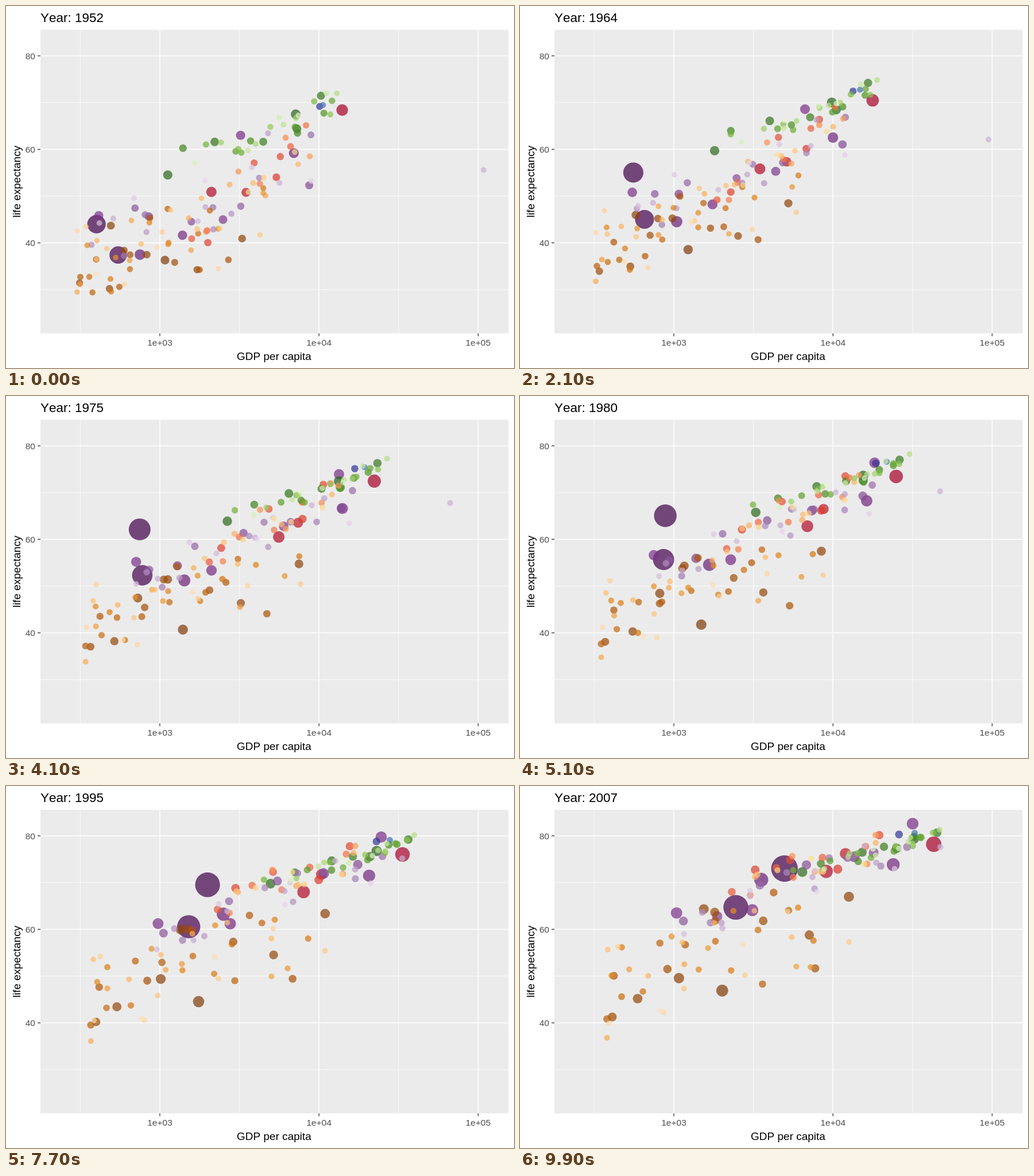
Recreate the animation shown at these times as an HTML page. Size 885 px wide and 632 px high, loop 10000 ms.

```html
<!DOCTYPE html>
<html lang="en">
<head>
<meta charset="utf-8">
<title>GDP and life expectancy</title>
<style>
  html, body { margin: 0; width: 100%; height: 100%; overflow: hidden; background: #fff; }
  svg { display: block; width: 885px; height: 632px; }
  text { font-family: "Liberation Sans", Arial, sans-serif; font-size: 19px; font-kerning: none; }
  #year { font-size: 22.5px; }
  .tick { font-size: 15.5px; fill: #4d4d4d; }
  .grid { stroke: #fff; }
  .mark { stroke: #333; stroke-width: 1.3; }
  #dots { fill-opacity: .7; }
</style>
</head>
<body>
<svg viewBox="0 0 885 632">
  <rect x="60" y="41.5" width="815.5" height="530" fill="#ebebeb"/>
  <g id="axes"></g>
  <g id="dots"></g>
  <text id="year" x="60" y="28">Year: 1952</text>
  <text x="467" y="618" text-anchor="middle">GDP per capita</text>
  <text transform="translate(25 306.5) rotate(-90)" text-anchor="middle">life expectancy</text>
</svg>
<script>
const $ = id => document.getElementById(id);
const FRAMES = 100, STEP = 100, FIRST = 1952, SPAN = 55, SURVEYS = 11;

const px = gdp => 268 + 277.25 * (Math.log10(gdp) - 3);
const py = life => 87 + (80 - life) * 8.163;
const radius = pop => 4.5 + 18.7 * Math.sqrt(pop / 1318);
const mix = (a, b, t) => a + (b - a) * t;
const clamp = v => Math.min(1, Math.max(0, v));
const easeOut = t => t * (1.5 - .5 * t);
const noise = (a, b) => {
  const v = Math.sin(a * 12.9898 + b * 78.233) * 43758.5453;
  return (v - Math.floor(v)) * 2 - 1;
};

function add(parent, tag, attrs, label) {
  const el = document.createElementNS("http://www.w3.org/2000/svg", tag);
  for (const name in attrs) el.setAttribute(name, attrs[name]);
  if (label) el.textContent = label;
  return $(parent).appendChild(el);
}

function drawAxes() {
  const line = (x1, y1, x2, y2, cls, w) =>
    add("axes", "line", { x1, y1, x2, y2, class: cls, ...(w && { "stroke-width": w }) });
  const column = (x, w) => line(x, 41.5, x, 571.5, "grid", w);
  const row = (y, w) => line(60, y, 875.5, y, "grid", w);

  for (const e of [2.5, 3.5, 4.5]) column(px(10 ** e), .75);
  for (const l of [30, 50, 70]) row(py(l), .75);
  for (const e of [3, 4, 5]) {
    const x = px(10 ** e);
    column(x, 1.45);
    line(x, 571.5, x, 576.5, "mark");
    add("axes", "text", { x, y: 593, class: "tick", "text-anchor": "middle" }, "1e+0" + e);
  }
  for (const l of [40, 60, 80]) {
    const y = py(l);
    row(y, 1.45);
    line(55, y, 60, y, "mark");
    add("axes", "text", { x: 51, y: y + 5.8, class: "tick", "text-anchor": "end" }, String(l));
  }
}

// Each trend runs from the poorest to the richest: log GDP, life expectancy and its spread.
// Shades run from the most to the least populous; pop is the range in millions.
const regions = {
  africa: {
    ramp: ["7f3b08", "b35806", "e08214", "fdb863", "fee0b6"],
    pop: [135, .2], growth: 3.7, count: 51, largest: 80, bend: 1.4,
    from: { gdp: [2.48, 3.65], life: [35, 44], spread: 8 },
    to: { gdp: [2.58, 4.1], life: [47, 62], spread: 10 }
  },
  americas: {
    ramp: ["a50026", "d73027", "f46d43", "fdae61", "fee090"],
    pop: [301, 1], growth: 2.5, count: 22, largest: 44, bend: 1,
    from: { gdp: [3.16, 4], life: [40, 66], spread: 6 },
    to: { gdp: [3.35, 4.35], life: [69, 78], spread: 3 }
  },
  asia: {
    ramp: ["40004b", "762a83", "9970ab", "c2a5cf", "e7d4e8"],
    pop: [1318, .7], growth: 2.6, count: 28, largest: 169, bend: 1,
    from: { gdp: [2.52, 4], life: [36, 61], spread: 8 },
    to: { gdp: [2.95, 4.6], life: [60, 79], spread: 4 }
  },
  europe: {
    ramp: ["276419", "4d9221", "7fbc41", "b8e186", "e6f5d0"],
    pop: [82, .3], growth: 1.35, count: 29, largest: 64, bend: .7,
    from: { gdp: [3.05, 4.15], life: [57, 71.5], spread: 3 },
    to: { gdp: [3.75, 4.67], life: [73, 81], spread: 1.2 }
  },
  oceania: {
    ramp: ["313695", "4575b4"],
    pop: [20, 4], growth: 2.2, count: 2, largest: 20, bend: 1,
    from: { gdp: [4, 4.03], life: [69, 69.4], spread: .2 },
    to: { gdp: [4.4, 4.54], life: [80, 81], spread: .2 }
  }
};

// The most prominent dots: GDP and life expectancy at a few evenly spaced times.
const leaders = [
  { region: "asia", pop: 1318, path: [[400, 44], [590, 57], [845, 64.8], [1780, 69.1], [4959, 73]] },
  { region: "asia", pop: 1110, path: [[547, 37.4], [834, 55.4], [2452, 64.7]] },
  { region: "americas", pop: 301, path: [[13990, 68.4], [42952, 78.2]] },
  { region: "asia", pop: 224, path: [[750, 37.5], [3541, 70.6]] },
  { region: "americas", pop: 190, path: [[2109, 50.9], [6840, 62.5], [9066, 72.4]] },
  { region: "africa", pop: 135, path: [[1077, 36.3], [2014, 46.9]] },
  { region: "asia", pop: 127, path: [[3217, 63], [17950, 76.2], [31656, 82.6]] },
  { region: "americas", pop: 109, path: [[3478, 50.8], [8640, 66.2], [11978, 76.2]] },
  { region: "europe", pop: 82, path: [[7144, 67.5], [32170, 79.4]] },
  { region: "asia", pop: 2.5, path: [[108382, 55.6], [88000, 65.8], [28000, 74], [47307, 77.6]] }
];

function shade({ ramp, pop: [high, low] }, pop) {
  const t = clamp(Math.log(high / pop) / Math.log(high / low)) ** 1.15;
  const at = t * (ramp.length - 1);
  const i = Math.min(Math.floor(at), ramp.length - 2);
  const channel = (hex, c) => parseInt(hex.slice(c * 2, c * 2 + 2), 16);
  const rgb = [0, 1, 2].map(c => Math.round(mix(channel(ramp[i], c), channel(ramp[i + 1], c), at - i)));
  return `rgb(${rgb})`;
}

// Wealth ranks are spread evenly; each country wanders around its region's trend.
function crowd(region, seed) {
  const { pop, count, largest, bend, from, to } = regions[region];
  return Array.from({ length: count }, (_, k) => {
    const id = k + 1 + seed * 60;
    const rank = (k * .618034 + .37 + seed * .21) % 1;
    const path = Array.from({ length: SURVEYS + 1 }, (_, s) => {
      const t = easeOut(s / SURVEYS);
      const shift = mix(noise(id, 20), noise(id, 21), t) * .12 + noise(id, s) * .02;
      const u = clamp(rank + shift);
      const drift = mix(noise(id, 22), noise(id, 23), t) + noise(id, s + 30) * .06;
      const trend = ({ gdp, life, spread }) =>
        [mix(...gdp, u ** bend), mix(...life, u) + spread * drift];
      const [a, b] = [trend(from), trend(to)];
      return [10 ** mix(a[0], b[0], t), mix(a[1], b[1], t)];
    });
    return { region, pop: largest * (pop[1] / largest) ** (k / (count - 1)), path };
  });
}

function makeDot({ region, pop, path }) {
  const { growth } = regions[region];
  return {
    el: add("dots", "circle", { fill: shade(regions[region], pop) }),
    points: path.map(([gdp, life]) => [px(gdp), py(life)]),
    r0: radius(pop / growth),
    r1: radius(pop)
  };
}

drawAxes();
const dots = [...leaders, ...Object.keys(regions).flatMap(crowd)]
  .sort((a, b) => b.pop - a.pop)
  .map(makeDot);

function draw(t) {
  $("year").textContent = "Year: " + Math.round(FIRST + SPAN * t);
  for (const { el, points, r0, r1 } of dots) {
    const at = t * (points.length - 1);
    const i = Math.min(Math.floor(at), points.length - 2);
    const [a, b] = [points[i], points[i + 1]];
    el.setAttribute("cx", mix(a[0], b[0], at - i).toFixed(2));
    el.setAttribute("cy", mix(a[1], b[1], at - i).toFixed(2));
    el.setAttribute("r", mix(r0, r1, t).toFixed(2));
  }
}

const start = performance.now();
let shown = -1;
function tick() {
  const frame = Math.floor((performance.now() - start) / STEP) % FRAMES;
  if (frame !== shown) draw((shown = frame) / (FRAMES - 1));
  requestAnimationFrame(tick);
}
tick();
</script>
</body>
</html>
```
